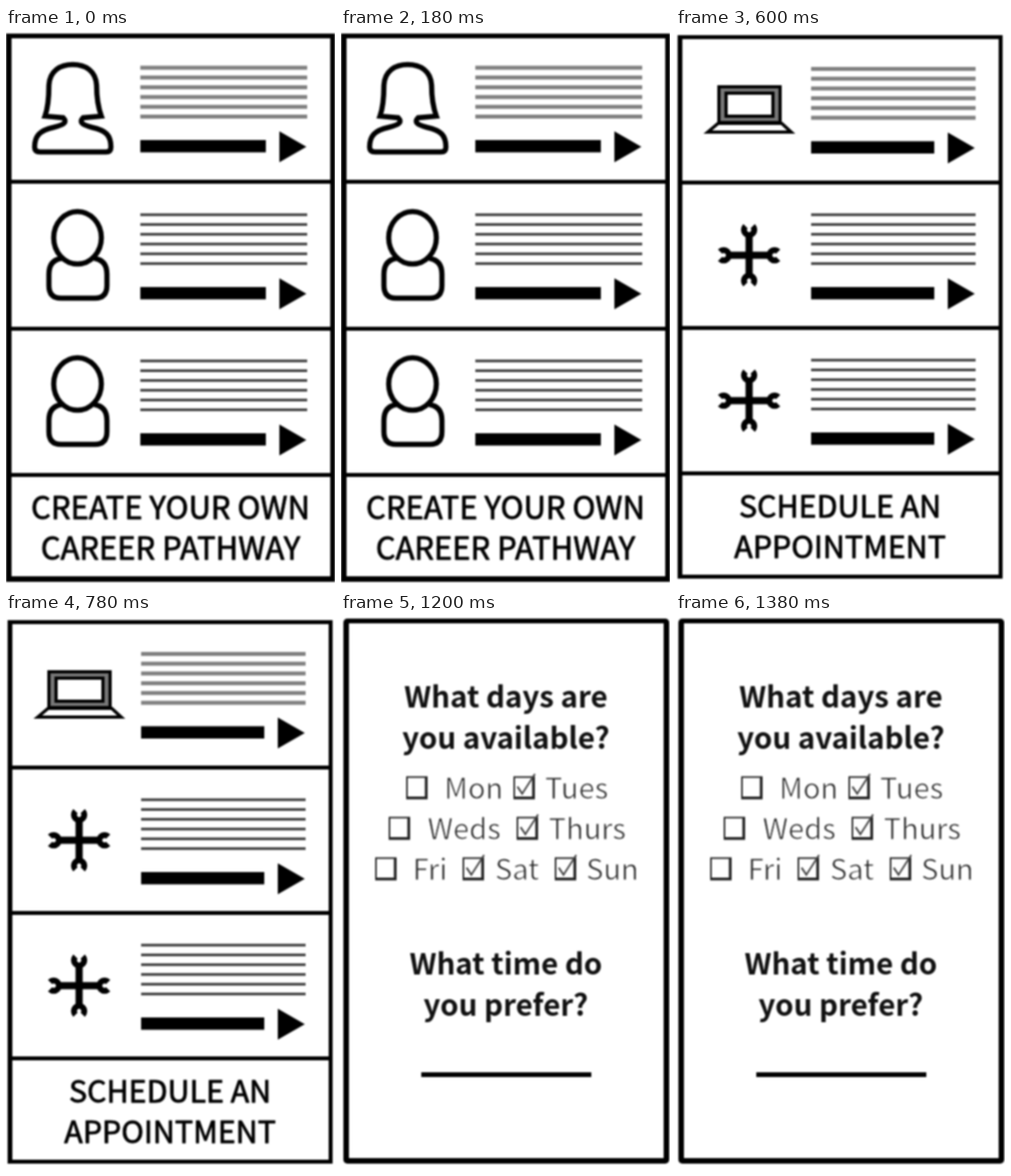
An HTML page with a canvas for the animation above (1500 ms loop, 414x701 px).

```html
<!DOCTYPE html>
<html lang="en">
<head>
<meta charset="utf-8">
<title>Career pathway screens</title>
<style>
html, body { margin: 0; height: 100%; overflow: hidden; background: #fff; }
canvas { display: block; filter: blur(0.8px); }
</style>
</head>
<body>
<canvas id="stage" width="414" height="701"></canvas>
<script>
const c = document.getElementById('stage').getContext('2d');
const FONT = '"Noto Sans CJK JP", "Noto Sans CJK SC", "Noto Sans CJK", "Noto Sans", sans-serif';
const HOLD = 300;

function box(x1, y1, x2, y2, color = '#000') {
  c.fillStyle = color;
  c.fillRect(x1, y1, x2 - x1, y2 - y1);
}

function shape(d, width, fill, stroke = '#000') {
  const path = new Path2D(d);
  if (fill) { c.fillStyle = fill; c.fill(path); }
  if (width) { c.lineWidth = width; c.strokeStyle = stroke; c.stroke(path); }
}

// A white outline thins the letters, a dark one thickens them.
function text(s, x, y, size, weight, color, outline, width) {
  c.font = `${weight} ${size}px ${FONT}`;
  c.textAlign = 'center';
  c.lineJoin = 'round';
  c.fillStyle = color;
  c.fillText(s, x, y);
  if (width) {
    c.strokeStyle = outline;
    c.lineWidth = width;
    c.strokeText(s, x, y);
  }
  c.lineJoin = 'miter';
}
const question = (s, y) => text(s, 207.5, y, 37.1, 700, '#111');
const answer = (s, x, y) => text(s, x, y, 36.5, 400, '#2a2a2a', '#fff', 0.9);
const button = (s, x, y, size) => text(s, x, y, size, 400, '#000', '#000', 0.9);

function lines(x1, x2, y, thick = 3.4, color = '#404040') {
  for (let i = 0; i < 6; i++) {
    const mid = y + i * 12.3;
    box(x1, mid - thick / 2, x2, mid + thick / 2, color);
  }
}

function row(x1, x2, y, soft) {
  lines(x1, x2, y, soft ? 5 : 3.4, soft ? '#808080' : '#404040');
  box(x1, y + 91, x2 - 52, y + 106.5);
  shape(`M${x2 - 35} ${y + 80}L${x2 - 1} ${y + 99.5}L${x2 - 35} ${y + 119}Z`, 0, '#000');
}

function woman() {
  shape(`M49 111C53 100 54 90 54 72C55 54 68 46 84 46C100 46 113 54 114 72
    C114 90 116 100 120 111L97 113C91 119 97 122 108 125C126 129 132 135 132 150
    Q132 156 126 156H43Q36 156 36 150C36 136 42 129 60 125C72 122 78 119 72 113Z`, 6.5);
}

function man(y) {
  c.save();
  c.translate(90, y);
  shape('M-20 26Q-36 28 -36 46V60Q-36 76 -21 76H22Q37 76 37 60V46Q37 28 21 26', 6.5);
  shape('M-30 0A30 33 0 1 1 30 0A30 33 0 1 1 -30 0Z', 6.5, '#fff');
  c.restore();
}

function laptop() {
  shape('M54 74H131V119H54Z', 4, '#777');
  shape('M63 82H122V111H63Z', 4, '#fff');
  shape('M53 120H133L145 131H40Z', 4, '#fff');
}

function wrenches(y) {
  c.save();
  c.translate(92, y);
  for (let i = 0; i < 4; i++) {
    box(-4.5, -26, 4.5, 2);
    c.beginPath();
    c.arc(0, -32, 6.5, -Math.PI / 4, Math.PI * 1.25);
    c.lineWidth = 7.5;
    c.strokeStyle = '#000';
    c.stroke();
    c.rotate(Math.PI / 2);
  }
  c.restore();
}

function checkbox(x, base, ticked) {
  const y = base - 28;
  box(x, y, x + 27, y + 29, '#222');
  box(x + 2, y + 2, x + 23.5, y + 25.5, '#fff');
  if (ticked) shape(`M${x + 5} ${y + 13}L${x + 11} ${y + 22}L${x + 27} ${y - 3}`, 2.3, null, '#444');
}

function option(s, x, boxX, base, ticked) {
  checkbox(boxX, base, ticked);
  answer(s, x, base);
}

function days(y) {
  option('Mon', 167, 82, y);
  option('Tues', 296.5, 217, y, true);
  option('Weds', 155, 60, y + 51);
  option('Thurs', 310, 221, y + 51, true);
  option('Fri', 112, 43, y + 102);
  option('Sat', 221.5, 153, y + 102, true);
  option('Sun', 341.5, 269, y + 102, true);
}

function formPanel() {
  c.fillStyle = '#000';
  c.beginPath();
  c.roundRect(3, 7, 410, 686, 5);
  c.fill();
  box(10, 13, 406, 686, '#fff');
}

function schedulePanel() {
  box(2, 9, 411, 693);
  box(8, 14, 406, 688, '#fff');
  box(8, 192, 406, 197);
  box(8, 558, 406, 563);
  laptop();
  row(170, 377, 51.5, true);
  button('SCHEDULE AN', 206.5, 616, 38.3);
  button('APPOINTMENT', 206.5, 667, 38.3);
}

function people() {
  box(0, 7, 414, 697);
  box(7, 13, 408, 690, '#fff');
  for (const y of [191, 376, 560]) box(7, y, 408, y + 5);
  woman();
  man(264);
  man(448);
  row(169, 379, 50, true);
  row(169, 379, 235);
  row(169, 379, 419);
  button('CREATE YOUR OWN', 207, 618, 39);
  button('CAREER PATHWAY', 207, 669, 39);
}

function survey() {
  formPanel();
  question('Are you a veteran?', 74);
  option('Yes', 162, 86, 147);
  option('No', 307.5, 235, 147, true);
  question('What days are you', 244);
  question('available for work?', 295.5);
  days(358.5);
  question('Do you enjoy', 547);
  question('interacting with', 598);
  question('other people?', 650);
}

function services() {
  schedulePanel();
  box(8, 375, 406, 380);
  wrenches(286);
  wrenches(469);
  row(170, 377, 235);
  row(170, 377, 418);
}

function details() {
  schedulePanel();
  for (const y of [246, 441]) {
    box(88, y - 5, 326, y + 5);
    lines(45, 253, y + 34.5);
    lines(274, 368, y + 34.5);
  }
  shape('M188 366H226L207 399Z', 0, '#000');
}

function booking() {
  formPanel();
  question('What days are', 119);
  question('you available?', 171);
  days(233.5);
  question('What time do', 455);
  question('you prefer?', 507);
  box(101, 578, 315, 584);
}

const screens = [people, survey, services, details, booking];

function draw() {
  box(0, 0, 414, 701, '#fff');
  screens[Math.floor(performance.now() / HOLD) % screens.length]();
  requestAnimationFrame(draw);
}
draw();
</script>
</body>
</html>
```
